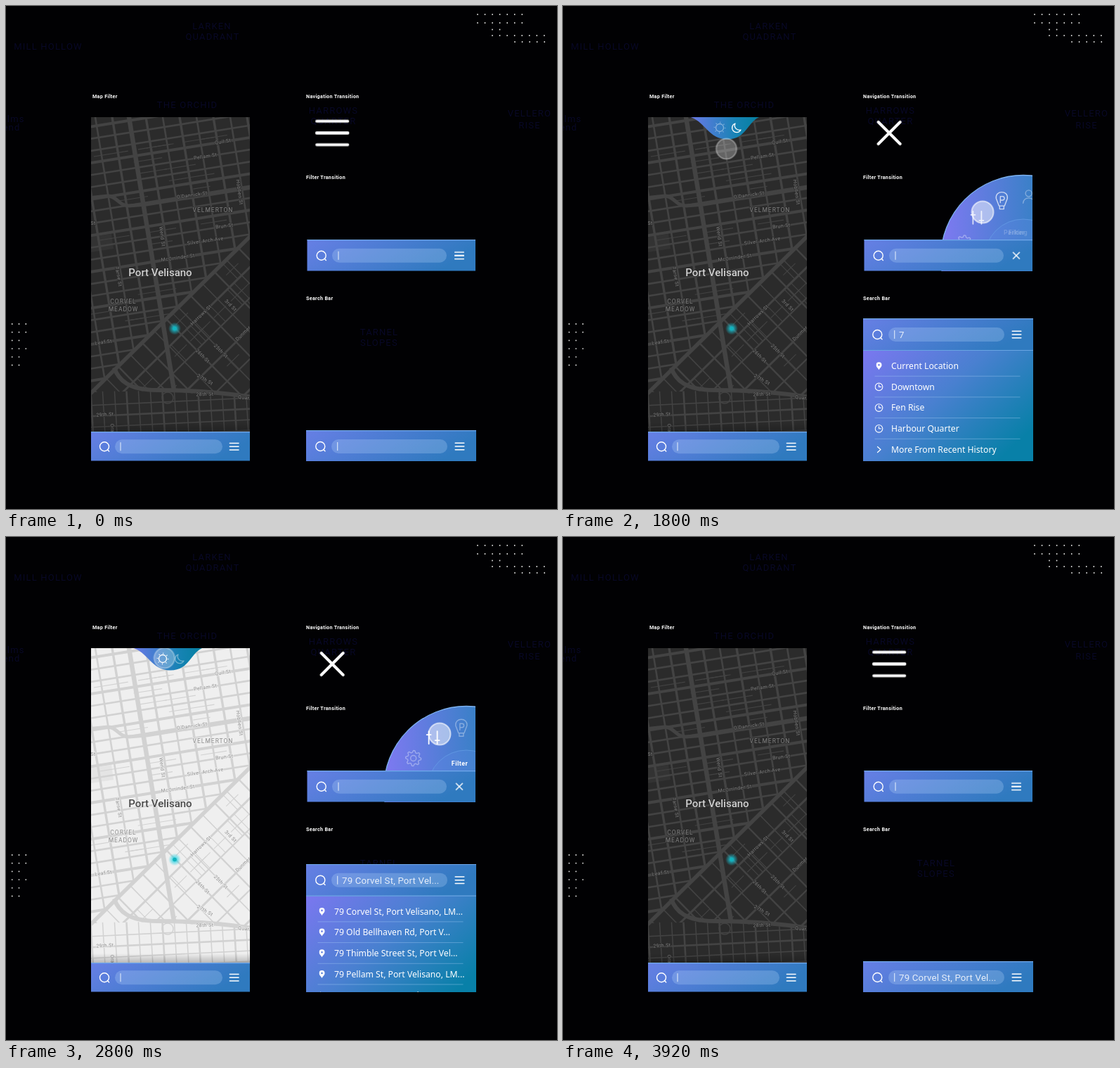
Recreate the animation shown at these times as an HTML page. Size 784x715 px, loop 3.96 s.

```html
<!DOCTYPE html>
<html lang="en">
<head>
<meta charset="utf-8">
<title>Map interactions</title>
<style>
@property --day { syntax: "<number>"; inherits: true; initial-value: 0; }
@property --turn { syntax: "<number>"; inherits: true; initial-value: 0; }
@property --show { syntax: "<number>"; inherits: true; initial-value: 0; }
@property --typed { syntax: "<number>"; inherits: true; initial-value: 0; }

html, body { margin: 0; width: 100%; height: 100%; overflow: hidden; background: #010103; }
svg { display: block; width: 784px; height: 715px; }
text { font-family: Roboto, sans-serif; fill: #fff; white-space: pre; }
.run { animation: 3.96s linear infinite; }
.line { fill: none; stroke: #fff; stroke-linecap: round; stroke-linejoin: round; }
.ghost text { font-size: 13px; letter-spacing: 1.2px; fill: #080826; text-anchor: middle; }
.head { font-size: 7.2px; font-weight: 700; letter-spacing: .3px; }

/* map */
#map {
  --land: color-mix(in srgb, #2b2b2b, #efefef calc(var(--day) * 100%));
  --road: color-mix(in srgb, #434343, #d2d2d2 calc(var(--day) * 100%));
  --ink: color-mix(in srgb, #808080, #8c8c8c calc(var(--day) * 100%));
  --city: color-mix(in srgb, #d2d2d2, #484848 calc(var(--day) * 100%));
  animation-name: day;
}
#land { fill: var(--land); }
#park { fill: var(--road); opacity: .35; }
#roads path { fill: none; stroke: var(--road); }
#names text {
  fill: var(--ink); stroke: var(--land); stroke-width: 1.5px; paint-order: stroke;
  text-anchor: middle; font-size: 7px; letter-spacing: .4px;
}
#names .area { font-size: 8.5px; letter-spacing: 1px; }
#names .city { font-size: 15px; font-weight: 500; letter-spacing: 0; fill: var(--city); }
#sun { opacity: calc(.4 + .6 * var(--day)); }
#moon { opacity: calc(1 - .6 * var(--day)); }
#drop { animation-name: drop; }
@keyframes day {
  0%, 54.5% { --day: 0; } 61.6%, 85.9% { --day: 1; } 92%, 100% { --day: 0; }
}
@keyframes drop {
  0%, 30.3% { transform: translateY(-33px); animation-timing-function: ease-out; }
  41.5%, 88% { transform: none; animation-timing-function: ease-in; }
  97%, 100% { transform: translateY(-33px); }
}

/* touches */
.touch circle { fill: #fff; fill-opacity: .5; stroke: #fff; stroke-opacity: .6; stroke-width: 2; }
#tapMap circle { fill-opacity: .27; stroke-opacity: .32; }
#tapMap { animation-name: tapMap; }
#tapFilter { animation-name: tapFilter; }
#tapSearch { animation-name: tapSearch; }
@keyframes tapMap {
  0%, 12% { transform: translate(240px, 180px); opacity: 0; }
  16.2% { transform: translate(237px, 174px); opacity: .6; }
  20% { opacity: 1; }
  28.3%, 30.3% { transform: translate(232px, 163px); animation-timing-function: ease-in-out; }
  42%, 45.5% { transform: translate(232.5px, 203px); animation-timing-function: ease-in-out; }
  53%, 70% { transform: translate(225px, 172px); animation-timing-function: ease-in-out; }
  77.8%, 85% { transform: translate(245px, 172px); opacity: 1; }
  89%, 100% { transform: translate(245px, 172px); opacity: 0; }
}
@keyframes tapFilter {
  0%, 9% { transform: translate(645px, 357px); opacity: 0; }
  12%, 16.2% { transform: translate(645px, 357px); opacity: 1; }
  28.3%, 30% { transform: translate(645px, 355px); animation-timing-function: ease-in-out; }
  37.9% { transform: translate(617px, 280px); }
  45.5% { transform: translate(597px, 293px); }
  51.8%, 56.8% { transform: translate(585px, 307px); }
  65.7% { transform: translate(611px, 286px); }
  69.4%, 71% { transform: translate(617px, 280px); }
  77.8% { transform: translate(638px, 336px); }
  81%, 85% { transform: translate(645px, 355px); opacity: 1; }
  89%, 100% { transform: translate(645px, 355px); opacity: 0; }
}
@keyframes tapSearch {
  0% { transform: translate(447px, 627px); opacity: 0; }
  4%, 10% { transform: translate(447px, 627px); opacity: 1; }
  13% { transform: translate(447px, 627px); opacity: 0; }
  13.01%, 23% { transform: translate(534px, 478px); opacity: 0; }
  27%, 33% { transform: translate(534px, 469px); opacity: 1; }
  36% { transform: translate(534px, 469px); opacity: 0; }
  36.01%, 59% { transform: translate(450px, 512px); opacity: 0; }
  61.5%, 63.5% { transform: translate(450px, 512px); opacity: 1; }
  65%, 100% { transform: translate(450px, 512px); opacity: 0; }
}
.ripple { fill: none; stroke: #fff; stroke-width: 2; vector-effect: non-scaling-stroke; }
@keyframes rippleOpen {
  0%, 8.9% { transform: scale(.6); opacity: 0; } 9% { transform: scale(.6); opacity: .6; }
  17.5%, 100% { transform: scale(1.08); opacity: 0; }
}
@keyframes rippleFilter {
  0%, 13% { transform: scale(.7); opacity: 0; } 14% { opacity: .9; }
  16.2% { transform: none; opacity: .85; } 19%, 100% { transform: scale(1.5); opacity: 0; }
}
@keyframes rippleItem {
  0%, 62% { transform: scale(.6); opacity: 0; } 63.5% { opacity: .8; }
  65.7% { transform: scale(.96); opacity: .55; } 68.7%, 100% { transform: scale(1.4); opacity: 0; }
}

/* menu to cross */
.edge { animation-name: edge; }
.slashA { animation-name: slashA; }
.slashB { animation-name: slashB; }
@keyframes edge {
  0%, 12.1% { opacity: 1; animation-timing-function: ease-in-out; }
  20.7%, 84.8% { opacity: 0; animation-timing-function: ease-in-out; }
  93.4%, 100% { opacity: 1; }
}
@keyframes slashA {
  0%, 12.1% { transform: none; animation-timing-function: ease-in-out; }
  20.7%, 84.8% { transform: rotate(45deg); animation-timing-function: ease-in-out; }
  93.4%, 100% { transform: none; }
}
@keyframes slashB {
  0%, 12.7% { transform: none; animation-timing-function: ease-in-out; }
  21.2%, 84.8% { transform: rotate(-45deg); animation-timing-function: ease-in-out; }
  93.4%, 100% { transform: none; }
}

/* filter wheel */
#wheel { animation-name: grow; }
#dial { animation-name: turn; }
@keyframes grow {
  0%, 14.4% { transform: scale(0); animation-timing-function: ease; }
  24.2%, 84.8% { transform: none; animation-timing-function: ease-in; }
  93%, 100% { transform: scale(0); }
}
@keyframes turn {
  0%, 37.9% { --turn: 0; } 45.5% { --turn: 16; } 51.8%, 56.8% { --turn: 28; }
  65.7% { --turn: 5; } 69.4%, 100% { --turn: 0; }
}
.tool {
  opacity: .35; stroke-width: 1.4;
  transform: rotate(calc((var(--a) - var(--turn)) * 1deg)) translateY(-87px)
    rotate(calc((var(--turn) - var(--a)) * 1deg));
}
#sliders { opacity: calc(1 - var(--turn) * .015); }
#meter { opacity: calc(.35 + var(--turn) * .022); }
#dial > text { font-size: 9px; font-weight: 700; letter-spacing: .4px; text-anchor: middle; }
#labelA { opacity: clamp(0, 1 - var(--turn) * .05, 1); }
#labelB { opacity: clamp(0, (var(--turn) - 13) * .066, 1); }

/* search panel */
#panel { animation-name: rise; }
#list { animation-name: show; }
#list text { font: 12.2px "Noto Sans", "Open Sans", sans-serif; }
.row { opacity: clamp(0, var(--show) - var(--i), 1); }
.old { animation-name: leave; }
.new { animation-name: enter; }
#query { font-size: 13.3px; letter-spacing: .15px; fill: #e6eefa; animation-name: type; }
#query tspan { fill-opacity: clamp(0, var(--typed) - var(--i), 1); }
@keyframes rise {
  0%, 9.85% { transform: translateY(159px); animation-timing-function: ease; }
  21.2%, 68.7% { transform: none; animation-timing-function: ease-in-out; }
  76.8%, 100% { transform: translateY(159px); }
}
@keyframes show { 0%, 12.1% { --show: 0; } 16.2% { --show: 1.15; } 27.3%, 100% { --show: 5; } }
@keyframes leave { 0%, 55.5% { opacity: 1; } 58%, 100% { opacity: 0; } }
@keyframes enter { 0%, 55.5% { opacity: 0; } 58%, 100% { opacity: 1; } }
@keyframes type {
  0% { --typed: 0; animation-timing-function: step-end; }
  44% { --typed: 1; animation-timing-function: step-end; }
  47.5% { --typed: 2; animation-timing-function: steps(23); }
  59%, 100% { --typed: 25; }
}
</style>
</head>
<body>
<svg viewBox="0 0 784 715">
  <defs>
    <linearGradient id="barFill" y2=".3"><stop stop-color="#677fe5"/><stop offset="1" stop-color="#2f7abf"/></linearGradient>
    <linearGradient id="bodyFill" y2=".7"><stop stop-color="#7b77f0"/><stop offset=".5" stop-color="#4980d0"/><stop offset="1" stop-color="#0880a8"/></linearGradient>
    <linearGradient id="wheelFill"><stop stop-color="#7f79f2"/><stop offset=".55" stop-color="#3b80c8"/></linearGradient>
    <linearGradient id="dropFill"><stop stop-color="#6f78ea"/><stop offset=".65" stop-color="#1783b4"/><stop offset="1" stop-color="#04809f"/></linearGradient>
    <linearGradient id="shade" x2="0" y2="1"><stop stop-opacity="0"/><stop offset="1" stop-opacity=".22"/></linearGradient>
    <radialGradient id="glow"><stop offset=".25" stop-color="#18d0e2" stop-opacity=".75"/><stop offset="1" stop-color="#18d0e2" stop-opacity="0"/></radialGradient>
    <clipPath id="mapClip"><path d="M121 158H347V605H121z"/></clipPath>
    <clipPath id="north"><path d="M121 158H347V328L121 550z"/></clipPath>
    <clipPath id="market"><path d="M121 550L347 328V556L215 547L121 549z"/></clipPath>
    <clipPath id="south"><path d="M121 548L215 547L347 556V605H121z"/></clipPath>
    <clipPath id="filterClip"><path d="M428 230H668V376.500H428z"/></clipPath>
    <clipPath id="searchClip"><path d="M427 430H669V647H427z"/></clipPath>
  </defs>

  <g class="ghost" id="ghost"></g>
  <g id="dots" fill="#e8e8e8"></g>

  <text class="head" x="123" y="131">Map Filter</text>
  <text class="head" x="427" y="131">Navigation Transition</text>
  <text class="head" x="427" y="246">Filter Transition</text>
  <text class="head" x="427" y="417.500">Search Bar</text>

  <g id="map" class="run" clip-path="url(#mapClip)">
    <path id="land" d="M121 158H347V605H121z"/>
    <path id="park" d="M121 328L150 324L153 345L121 350z"/>
    <g id="roads"></g>
    <g id="names"></g>
    <circle cx="240" cy="458.500" r="9" fill="url(#glow)"/>
    <circle cx="240" cy="458.500" r="2.800" fill="#12b2bd"/>
    <path d="M121 592H347V605H121z" fill="url(#shade)"/>
    <g id="drop" class="run">
      <path d="M178 157C203 163 206 189.500 234 189.500S262 163 282 157z" fill="url(#dropFill)"/>
      <g id="sun" class="line" transform="translate(223 173)" stroke-width="1.300">
        <circle r="5.500"/><circle r="7.500" stroke-dasharray="1 4.890" stroke-width="1.800" stroke-linecap="butt"/>
      </g>
      <path id="moon" d="M245 167A6.500 6.500 0 1 0 253 176A6.500 6.500 0 0 1 245 167z" class="line" stroke-width="1.300"/>
    </g>
    <g id="tapMap" class="touch run"><circle r="14.500"/></g>
  </g>
  <g id="mapBar"></g>

  <g id="nav" transform="translate(464.200 180.500)" stroke-width="4"></g>

  <g clip-path="url(#filterClip)">
    <g transform="translate(655 358)">
      <g id="wheel" class="run">
        <circle r="117.500" fill="url(#wheelFill)" stroke="#7db2f0" stroke-width="1.300"/>
        <circle r="55" fill="#5b86e0" fill-opacity=".35" stroke="#6ba6ea" stroke-opacity=".6"/>
        <g id="dial" class="run">
          <g id="gear" class="tool line" style="--a:-60"><circle r="4"/></g>
          <path id="sliders" class="tool line" style="--a:-33;stroke-width:1.8" d="M-6 -9V9M-9 -4H-3M6 -9V9M3 4H9"/>
          <g id="meter" class="tool line" style="--a:-4.700">
            <path d="M-4 7.500L-8 -3C-9.500 -15 9.500 -15 8 -3L4 7.500zM-3 7.500V12H3V7.500"/>
            <path d="M-2 3V-6H1A2.700 2.700 0 0 1 1 -.6H-2"/>
          </g>
          <g class="tool line" style="--a:21"><circle cy="-5" r="4.500"/><path d="M-8 9C-8 -1 8 -1 8 9"/></g>
          <text id="labelA" x="-9.500" y="-33">Filter</text>
          <text id="labelB" x="-11" y="-33">Parking</text>
        </g>
      </g>
    </g>
    <g id="filterBar"></g>
    <g class="touch run" id="tapFilter"><circle r="15.500"/></g>
    <g transform="translate(645 357)"><circle class="ripple run" r="21" style="animation-name:rippleFilter"/></g>
  </g>

  <g clip-path="url(#searchClip)">
    <g id="panel" class="run">
      <path d="M427 488H669V647H427z" fill="url(#bodyFill)"/>
      <g id="list" class="run"></g>
      <g id="searchBar"></g>
      <path d="M427 489.500H669" stroke="#69a5e2" stroke-width="1.200"/>
      <text id="query" class="run" x="478" y="472"></text>
    </g>
    <g class="touch run" id="tapSearch"><circle r="15.500"/></g>
    <g transform="translate(447 627)"><circle class="ripple run" r="21" style="animation-name:rippleOpen"/></g>
    <g transform="translate(450 512)"><circle class="ripple run" r="21" style="animation-name:rippleItem;stroke-width:3"/></g>
  </g>
</svg>
<script>
const put = (id, html) => document.getElementById(id).insertAdjacentHTML("beforeend", html);
const range = (n, from = 0) => Array.from({ length: n }, (_, i) => i + from);
const seg = (x1, y1, x2, y2) => `M${x1} ${y1}L${x2} ${y2}`;
const road = (d, w) => `<path d="${d}" stroke-width="${w}"/>`;

let seed = 11;
const rnd = () => (seed = seed * 16807 % 2147483647) / 2147483647;

// Backdrop
[[60, 62, "MILL HOLLOW"], [293, 33, "LARKEN"], [294, 48, "QUADRANT"], [258, 145, "THE ORCHID"],
 [466, 153, "HARROWS"], [466, 168, "QUARTER"], [745, 157, "VELLERO"], [745, 174, "RISE"],
 [531, 468, "TARNEL"], [531, 483, "SLOPES"], [10, 165, "Elms"], [8, 177, "end"]]
  .forEach(([x, y, s]) => put("ghost", `<text x="${x}" y="${y}">${s}</text>`));

const dots = (x, y, n, step) =>
  put("dots", range(n).map(i => `<circle cx="${x + i * step}" cy="${y}" r=".9"/>`).join(""));
[[671, 12, 7], [671, 24, 7], [692, 33.5, 2], [692, 42, 8], [724, 51, 5]].forEach(([x, y, n]) => dots(x, y, n, 10.55));
[3, 3, 2, 3, 2, 2].forEach((n, i) => dots(8.7, 452 + i * 11.7, n, 9.8));

// Streets
const cross = (y, x1, x2) => seg(x1, y - .16 * (x1 - 234), x2, y - .16 * (x2 - 234));
const down = (x, y1, y2) => seg(x + .165 * (y1 - 158), y1, x + .165 * (y2 - 158), y2);

const north = range(24, -4).map(k => road(cross(205 + 17.2 * k, 110, 360), k % 3 ? 2.6 : 4)).join("")
  + range(14, -5).map(j => road(down(175 + 24 * j, 150, 570), j % 2 ? 3.4 : 2.6)).join("")
  + range(26).map(() => {
      const y = 196.5 + 17.2 * Math.floor(rnd() * 15), x = 115 + rnd() * 190;
      return road(cross(y, x, x + 24 + rnd() * 30), 1.1);
    }).join("");
const market = range(5, 1).map(i => road(seg(-190, 31 * i, 190, 31 * i), i % 2 ? 3 : 2.2)).join("")
  + range(14, -7).map(i => road(seg(7 + 24 * i, 0, 7 + 24 * i, 170), i % 2 ? 2.4 : 1.6)).join("")
  + range(18).map(() => {
      const x = -140 + rnd() * 250, y = 15.5 + 31 * Math.floor(rnd() * 4);
      return road(seg(x, y, x + 24, y) + seg(x + 8, y - 15, x + 8, y + 15), 1.1);
    }).join("");
const south = range(15).map(i => road(seg(120 + 17 * i, 540, 124 + 17 * i, 608), i % 3 ? 1.5 : 2.6)).join("")
  + range(4).map(i => road(seg(115, 568 + 15.5 * i, 350, 557 + 15.5 * i), i % 2 ? 2.6 : 1.6)).join("");

put("roads", `<g clip-path="url(#north)">${north}</g>
  <g clip-path="url(#market)"><g transform="translate(240 433) rotate(-44.5)">${market}</g></g>
  <g clip-path="url(#south)">${south}</g>`
  + road("M115 556L352 323", 5.5) + road(down(175, 150, 548), 6.5)
  + road("M154 514C160 532 175 546 215 546S300 548 350 556", 6)
  + road("M116 273L145 270C158 270 160 284 175 284L200 282L350 258", 5)
  + '<path d="M222 557a8 8 0 1 0 16 0a8 8 0 1 0 -16 0" stroke-width="1.500"/>');

[[309, 195, -9, "Quil St"], [284, 216, -9, "Pellam St"], [265, 271, -8, "O'Dannick St"],
 [311, 315, -7, "Brun St"], [284, 336, -8, "Silver Arch Ave"], [245, 360, -8, "McOrrinder St"],
 [220, 328, 82, "Wend St"], [330, 265, 82, "Hobben St"], [158, 385, 80, "Tarne St"],
 [279, 441, -44, "Harrows St"], [318, 427, 45, "3rd St"], [304, 492, 45, "25th St"],
 [278, 499, 45, "26th St"], [282, 533, 30, "27th St"], [283, 554, -2, "28th St"],
 [141, 583, -3, "29th St"], [139, 480, -8, "Leaf St"], [339, 467, -44, "Dunmer"],
 [339, 559, 8, "Quarl"], [124, 311, 0, "St"], [149, 600, 85, "Ora"],
 [294.5, 292.5, 0, "VELMERTON", "area"], [167, 423, 0, "CORVEL", "area"], [167, 434, 0, "MEADOW", "area"],
 [219.5, 384, 0, "Port Velisano", "city"]]
  .forEach(([x, y, r, s, c = ""]) =>
    put("names", `<text class="${c}" transform="translate(${x} ${y}) rotate(${r})">${s}</text>`));

// Bars and menus
const menu = (w, gap, morph) => {
  const bar = (y, c) => `<path class="line ${morph ? "run " + c : ""}" d="M${-w} ${y}H${w}"/>`;
  return bar(-gap, "edge") + bar(gap, "edge") + bar(0, "slashA") + (morph ? bar(0, "slashB") : "");
};
const bar = (id, x, y, w, h, icon, pill, pillEnd, caret, menuX, morph) => {
  const m = y + h / 2 + .5;
  put(id, `<rect x="${x}" y="${y}" width="${w}" height="${h}" fill="url(#barFill)"/>
    <path d="M${x} ${y + .6}h${w}" stroke="#70a8ea" stroke-width="1.2"/>
    <g class="line" stroke-width="1.4"><circle cx="${icon}" cy="${m}" r="6.5"/><path d="M${icon + 4.5} ${m + 4.5}l2.200 2.200"/></g>
    <rect x="${pill}" y="${m - 10}" width="${pillEnd - pill}" height="20" rx="10" fill="#b4d2f8" fill-opacity=".28"/>
    <path d="M${caret} ${m - 6}v12" stroke="#dfeafa" stroke-width="1.1"/>
    <g transform="translate(${menuX} ${m})" stroke-width="1.5">${menu(6.3, 4.7, morph)}</g>`);
};
bar("mapBar", 121, 605, 226, 41.5, 140, 155, 308, 163, 324.7);
bar("filterBar", 428.5, 332, 239.5, 44.5, 448.7, 464, 627, 473, 645, true);
bar("searchBar", 427, 444, 242, 45, 447.3, 463, 628, 471.7, 645.5);
put("nav", menu(22, 16.8, true));

const teeth = range(32).map(i => {
  const r = i % 4 < 2 ? 11 : 8.3, a = i * Math.PI / 16;
  return `${(r * Math.cos(a)).toFixed(1)} ${(r * Math.sin(a)).toFixed(1)}`;
});
put("gear", `<path d="M${teeth.join("L")}z"/>`);

// Suggestions
const pin = '<path fill="#fff" fill-rule="evenodd" d="M0 5.500C-2 2 -4 1 -4 -1.500A4 4 0 0 1 4 -1.500C4 1 2 2 0 5.500zM-1.300 -1.500a1.300 1.300 0 1 0 2.600 0a1.300 1.300 0 1 0 -2.600 0"/>';
const clock = '<g class="line" stroke-width="1.100"><circle r="5.300"/><path d="M0 -3V0H3"/></g>';
const chevron = '<path class="line" stroke-width="1.200" d="M-2 -4L2.500 0L-2 4"/>';
const entry = (icon, s, c = "") => `<g class="${c}">${icon}<text x="17.500" y="4.300">${s}</text></g>`;
[["Current Location", "79 Corvel St, Port Velisano, LM..."],
 ["Downtown", "79 Old Bellhaven Rd, Port V..."],
 ["Fen Rise", "79 Thimble Street St, Port Vel..."],
 ["Harbour Quarter", "79 Pellam St, Port Velisano, LM..."],
 ["More From Recent History"]].forEach(([a, b], i) => {
  const rows = b ? entry(i ? clock : pin, a, "run old") + entry(pin, b, "run new")
    + '<path d="M-6 14.500H201" stroke="#a9cdf5" stroke-opacity=".4"/>' : entry(chevron, a);
  put("list", `<g class="row" style="--i:${i}"><g transform="translate(449.500 ${511.7 + i * 29.7})">${rows}</g></g>`);
});
put("query", [..."79 Corvel St, Port Vel..."].map((c, i) => `<tspan style="--i:${i}">${c}</tspan>`).join(""));
</script>
</body>
</html>
```
